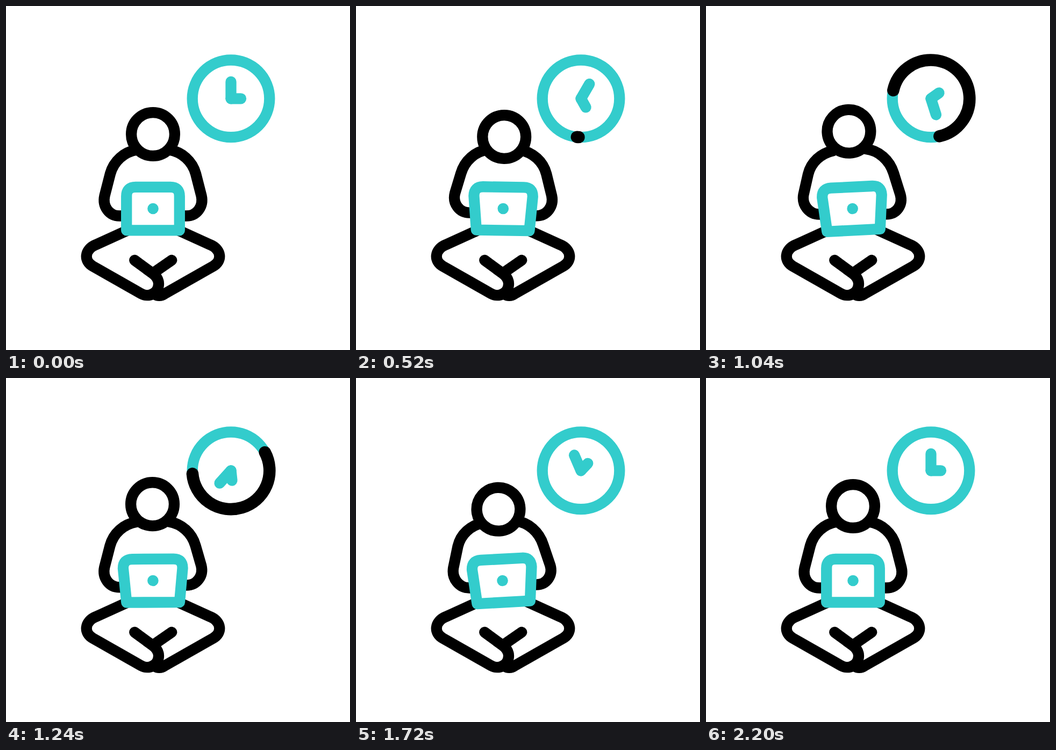
Animation of 640 by 640 pixels, one loop 2.44 s. Source, as an HTML page:

```html
<!DOCTYPE html>
<html lang="en">
<head>
<meta charset="utf-8">
<title>Working hours</title>
<style>
  html, body { margin: 0; width: 100%; height: 100%; overflow: hidden; background: #fff; }
  svg { display: block; width: 100%; height: 100%; }
  path, circle { fill: none; stroke: #000; stroke-width: 20.3; stroke-linecap: round; stroke-linejoin: round; }
  .teal { stroke: #3cc; }
  .solid { fill: #fff; }
  #dot { fill: #3cc; stroke: none; }
  #arc { stroke-width: 22.6; }
</style>
</head>
<body>
<svg viewBox="0 0 640 640">
  <path d="M228 416.6 L167 444.2 C146 453 144 474.5 162 484.3 L251.5 535.3 C266 543.3 284 534 284 517 C284 508 279 502 272 497 L239.3 473"/>
  <path d="M319 416.6 L380 444.2 C401 453 403 474.5 385 484.3 L295.5 535.3 C291 538.5 285 539.6 280 538.3"/>
  <path d="M308.2 473 L275 496"/>
  <path id="armL"/>
  <path id="armR"/>
  <circle id="head" class="solid" cx="273.5" cy="238.5" r="40.4"/>
  <g id="laptop">
    <path id="lid" class="teal solid"/>
    <circle id="dot" cx="273.5" cy="377" r="10.3"/>
  </g>
  <circle class="teal" cx="418.5" cy="172.3" r="71.8"/>
  <path id="arc"/>
  <path id="minute" class="teal" d="M418.5 172.3 V140.9"/>
  <path id="hour" class="teal" d="M418.5 172.3 H437"/>
</svg>
<script>
const LOOP = 2440;
const PIVOT = { x: 273.5, y: 395 };
const CLOCK = { x: 418.5, y: 172.3, r: 71.8 };
const el = id => document.getElementById(id);
const set = (id, name, value) => el(id).setAttribute(name, value);

const clamp = x => Math.min(1, Math.max(0, x));
const ease = x => x * x * (3 - 2 * x);
const ramp = (t, a, b) => clamp((t - a) / (b - a));

// Eased value along [time, value] keys
function track(keys, t) {
  let value = keys[0][1];
  for (let i = 1; i < keys.length; i++) {
    const [t0, v0] = keys[i - 1], [t1, v1] = keys[i];
    if (t >= t0) value = v0 + (v1 - v0) * ease(ramp(t, t0, t1));
  }
  return value;
}

const TILT = [[200, 0], [600, .9], [950, -3.2], [1410, .9], [1765, -3.3], [2200, 0]];
const BOB = [[200, 0], [640, 6], [1100, -6], [1620, 6], [2200, 0]];
const SPREAD = [[200, 0], [600, 6], [1760, 6], [2200, 0]];
const TYPING = [[200, -1], [500, 1], [750, -1], [930, 1], [1150, -1],
                [1470, 1], [1720, -1], [1960, 1], [2200, -1]];

// side: -1 left, 1 right; points are distances from the body's middle
function arm(side, tilt, lift) {
  const rad = tilt * Math.PI / 180;
  const pt = (dx, y, up = 0, roll = 0) => {
    const x = side * dx, h = PIVOT.y - y;
    return `${PIVOT.x + x + h * Math.sin(rad)} ${y - up + x * Math.sin(rad) * roll}`;
  };
  return `M${pt(30, 267.5, 0, 1)} C${pt(54, 271.5, 0, 1)} ${pt(73, 288.5, 0, .6)} ${pt(79.5, 312, 0, .3)}`
    + ` L${pt(90, 353, lift * .8)} C${pt(94.5, 373, lift)} ${pt(81.5, 390.5, lift)} ${pt(62.5, 390.5, lift)} L${pt(51, 390.5, lift)}`;
}

function lid(s) {
  const l = 224.2 - s, r = 322.8 + s;
  return `M224.2 417.4 L${l} 354 Q${l} 336.8 ${l + 17} 336.8 H${r - 17} Q${r} 336.8 ${r} 354 L322.8 417.4 Z`;
}

function arc(t) {
  if (t <= 480 || t >= 1680) return "";
  const base = 178.5 + 141 * ramp(t, 480, 1680);
  const from = base + 360 * ease(ramp(t, 880, 1680));
  const to = base + 360 * ease(ramp(t, 480, 1280));
  const at = deg => {
    const a = deg * Math.PI / 180;
    return `${CLOCK.x + CLOCK.r * Math.sin(a)} ${CLOCK.y - CLOCK.r * Math.cos(a)}`;
  };
  return `M${at(from)} A${CLOCK.r} ${CLOCK.r} 0 ${+(to - from > 180)} 1 ${at(to)}`;
}

function draw(t) {
  const tilt = track(TILT, t);
  const turn = `rotate(${tilt} ${PIVOT.x} ${PIVOT.y})`;
  set("head", "transform", `translate(0 ${track(BOB, t)}) ${turn}`);
  set("laptop", "transform", turn);
  set("lid", "d", lid(track(SPREAD, t)));

  const reach = 6 * ease(ramp(t, 200, 400)) * (1 - ease(ramp(t, 2000, 2200)));
  const tap = track(TYPING, t);
  set("armL", "d", arm(-1, tilt, reach * (1 + tap) / 2));
  set("armR", "d", arm(1, tilt, reach * (1 - tap) / 2));

  const spin = 360 * ease(ramp(t, 200, 2000));
  set("minute", "transform", `rotate(${spin} ${CLOCK.x} ${CLOCK.y})`);
  set("hour", "transform", `rotate(${2 * spin} ${CLOCK.x} ${CLOCK.y})`);
  set("arc", "d", arc(t));
}

const start = performance.now();
function tick() {
  draw((performance.now() - start) % LOOP);
  requestAnimationFrame(tick);
}
tick();
</script>
</body>
</html>
```
